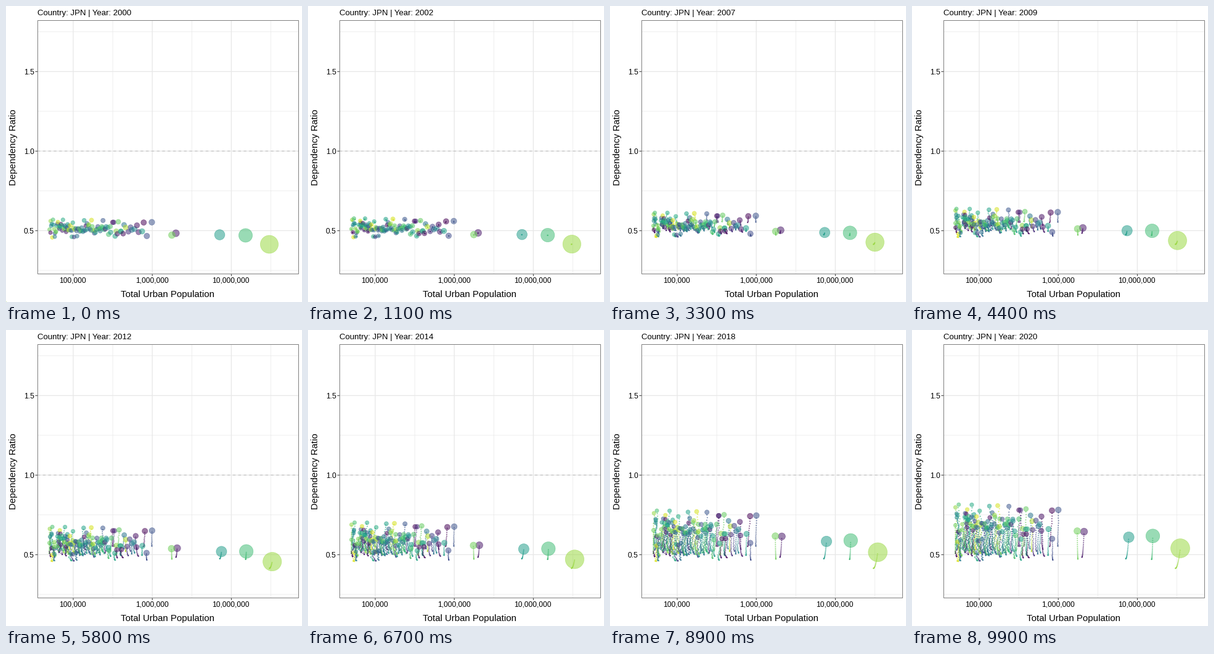
Animation of 480x480 px, one loop 10000 ms. Source, as a matplotlib script:

```python
import numpy as np
import matplotlib
import matplotlib.pyplot as plt
from matplotlib.animation import FuncAnimation

matplotlib.rcParams["font.family"] = ["Liberation Sans", "DejaVu Sans"]

SIZE, FRAMES, YEARS, TOWNS = 480, 100, 20, 106
PT = 0.75  # points per pixel at 96 dpi
LEFT, RIGHT, TOP, BOTTOM = 51, 474, 23, 434
DECADE, UNIT = 128.2, 258.0
GRID, INK = "#e8e8e8", "#333333"

# The largest areas: x and y in 2000, x and y in 2020, palette position
METROS = np.array([
    (427, 386.5, 435, 354, .845),
    (388.5, 372, 390.5, 334, .69),
    (346.5, 371, 351.5, 336, .55),
    (275.5, 368.5, 279, 327, .06),
    (269, 371.5, 268, 326, .78),
])


def px(pop):
    return 109 + DECADE * (np.log10(pop) - 5)


def py(ratio):
    return 364.3 - UNIT * (ratio - 0.5)


def radius(x):
    pop = 10 ** (5 + (x - 109) / DECADE)
    return 2.57 + 0.00218 * np.sqrt(pop)


def area(r):
    return (2 * r * PT) ** 2


def make_towns(rng):
    """Many small towns, thinning out as population grows."""
    u = (np.arange(TOWNS) + rng.random(TOWNS)) / TOWNS
    x0 = 70.4 + 182 * (1 - np.sqrt(1 - u))
    y0 = 362 + 36 * (rng.beta(2.2, 2.2, TOWNS) - 0.5)
    x1 = x0 + rng.normal(0, 2, TOWNS)
    y1 = 324 + 2.1 * (y0 - 366)  # younger towns age less
    return np.column_stack([x0, y0, x1, y1, rng.random(TOWNS) * 0.95])


def build_tracks():
    """Yearly positions, shape (years + 1, dots, 2), and palette positions."""
    rng = np.random.default_rng(12)
    x0, y0, x1, y1, tone = np.vstack([METROS, make_towns(rng)]).T
    year = np.arange(YEARS + 1)
    s = (year / YEARS)[:, None]

    rise = y0 - y1
    power = np.clip(1.6 + (57 - rise) * 0.022, 1.58, 2.05)
    y = y0 - rise * s ** power

    # Small places wander sideways from year to year
    loose = np.clip((260 - x0) / 90, 0, 1.5)
    sway = np.interp(year, [0, 9, 16, 20], [0, -2, 1.8, 0])[:, None]
    wander = sway * rng.uniform(0.2, 1.2, x0.size) + rng.normal(0, 0.5, y.shape)
    x = x0 + (x1 - x0) * s + wander * loose * (s > 0)
    return np.stack([np.maximum(x, 70.4), y], axis=2), tone


fig = plt.figure(figsize=(5, 5), dpi=96, facecolor="white")
ax = fig.add_axes([0, 0, 1, 1])
ax.set_xlim(0, SIZE)
ax.set_ylim(SIZE, 0)
ax.axis("off")


def line(x0, y0, x1, y1, color, width, z=1, **kw):
    ax.plot([x0, x1], [y0, y1], color=color, lw=width * PT, zorder=z,
            solid_capstyle="butt", dash_capstyle="butt", snap=False, **kw)


def label(x, y, text, size, ha="center", **kw):
    return ax.text(x, y, text, fontsize=size * PT, ha=ha, va="baseline",
                   color="black", **kw)


def scatter(points, r, stroke, z):
    return ax.scatter(*points.T, s=area(r), c=colors, edgecolors=colors,
                      linewidths=stroke * PT, zorder=z)


for half in range(6):
    gx = px(10 ** (5 + half / 2))
    line(gx, TOP, gx, BOTTOM, GRID, 0.7 if half % 2 else 1.3)
for quarter in range(1, 8):
    gy = py(quarter / 4)
    line(LEFT, gy, RIGHT, gy, GRID, 0.7 if quarter % 2 else 1.3)
line(LEFT, py(1), RIGHT, py(1), "#bebebe", 1.1, 2, dashes=(4, 4))

for pop in (10 ** 5, 10 ** 6, 10 ** 7):
    line(px(pop), BOTTOM, px(pop), BOTTOM + 4, INK, 1)
    label(px(pop) - 0.6, 448.7, f"{pop:,}", 12)
for ratio in (0.5, 1.0, 1.5):
    line(LEFT - 3.5, py(ratio), LEFT, py(ratio), INK, 1)
    label(45.6, py(ratio) + 4.3, f"{ratio:.1f}", 12, "right")

ax.add_patch(plt.Rectangle((LEFT, TOP), RIGHT - LEFT, BOTTOM - TOP, fill=False,
                           ec="#7f7f7f", lw=PT, zorder=5))
label(261.8, 472, "Total Urban Population", 15)
label(16.3, 229, "Dependency Ratio", 15, rotation=90, rotation_mode="anchor")
title = label(51, 14.9, "", 13.2, "left")

tracks, tone = build_tracks()
colors = plt.get_cmap("viridis")(tone)
colors[:, 3] = 0.53
marks = tracks.reshape(-1, 2)
mark_frames = np.round(np.arange(YEARS + 1) * (FRAMES - 1) / YEARS)

trail = scatter(tracks[0], 0.75, 0.55, 3)
dots = scatter(tracks[0], radius(tracks[0, :, 0]), 0.7, 4)


def update(i):
    t = YEARS * i / (FRAMES - 1)
    k = min(int(t), YEARS - 1)
    pos = tracks[k] + (tracks[k + 1] - tracks[k]) * (t - k)
    dots.set_offsets(pos)
    dots.set_sizes(area(radius(pos[:, 0])))
    past = int(np.sum(mark_frames < i))
    trail.set_offsets(marks[:past * len(tone)])
    title.set_text(f"Country: JPN | Year: {2000 + round(t)}")
    return trail, dots, title


anim = FuncAnimation(fig, update, frames=FRAMES, interval=100, repeat=True,
                     repeat_delay=0)
plt.show()
```
